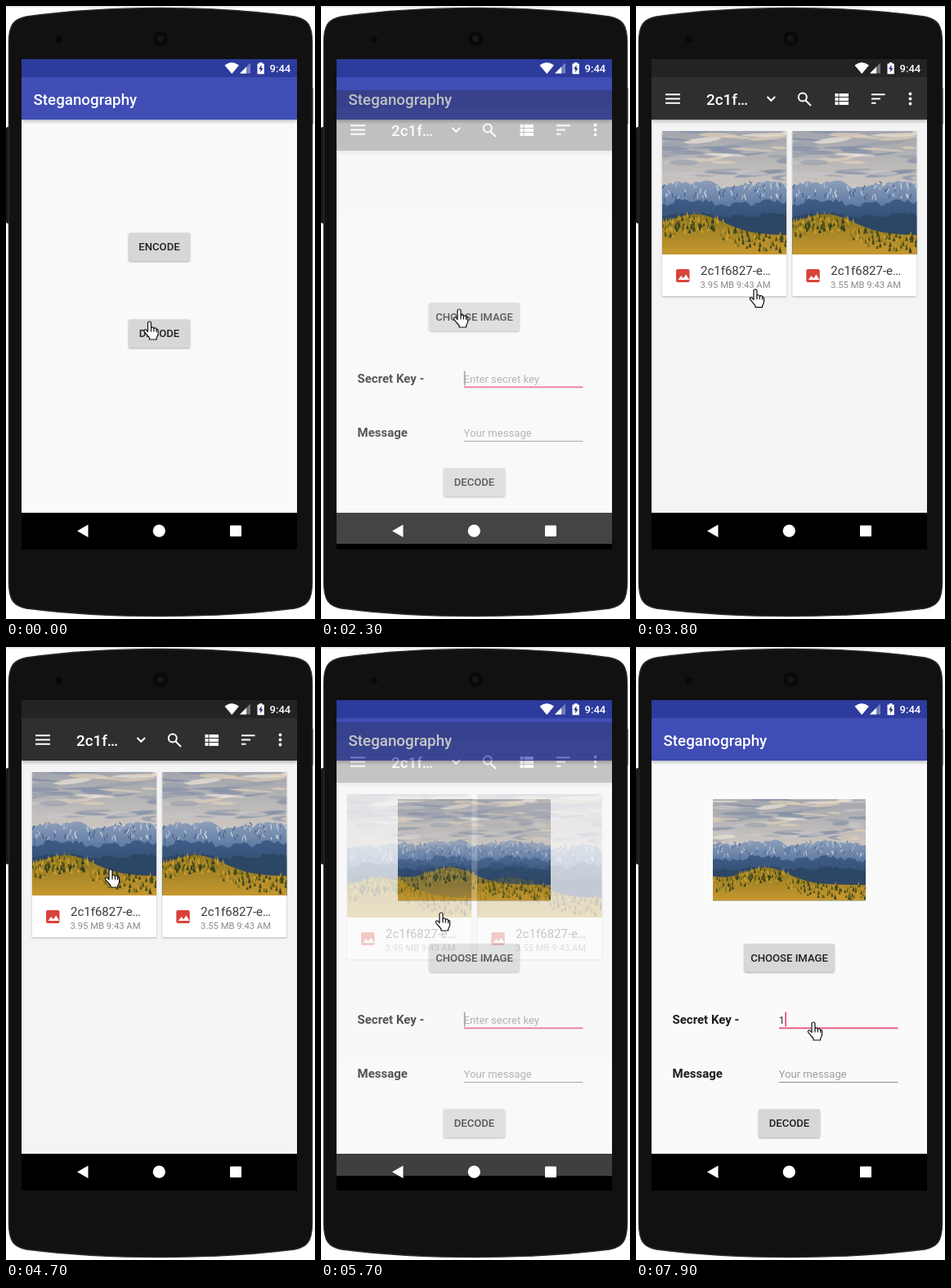
Animation, 378 px wide and 750 px high, one loop 8 s. Source, as an HTML page:

```html
<!DOCTYPE html>
<html lang="en">
<head>
<meta charset="utf-8">
<title>Steganography demo</title>
<style>
  html, body { margin: 0; width: 100%; height: 100%; overflow: hidden; background: #fff; }
  svg { display: block; }
  #stage { width: 378px; height: 750px; font-family: Roboto, sans-serif; }
  .title { font-size: 18.75px; font-weight: 500; fill: #fff; }
  .btn text { font-size: 13.1px; font-weight: 500; fill: #212121; text-anchor: middle; }
  .btn rect { fill: #d6d7d7; filter: drop-shadow(0 1px 1px #0005); }
  .label { font-size: 15px; font-weight: 700; fill: #1c1c1c; }
  .hint { font-size: 13.1px; fill: #9c9c9c; }
  .bar { filter: drop-shadow(0 2px 2px #0004); }
  .card { fill: #fff; filter: drop-shadow(0 1px 1px #0004); }
  .name { font-size: 15px; fill: #3a3a3a; }
  .info { font-size: 11.25px; fill: #8a8a8a; }
  .line { fill: none; stroke: #fff; stroke-width: 2; }
</style>
</head>
<body>
<svg id="stage" viewBox="0 0 378 750">
  <defs>
    <clipPath id="screen"><rect x="19" y="65" width="337" height="600"/></clipPath>
    <linearGradient id="sky" x2="0" y2="1">
      <stop offset="0" stop-color="#a2a5ad"/><stop offset=".55" stop-color="#d5cdc4"/><stop offset="1" stop-color="#e8dbc5"/>
    </linearGradient>
    <linearGradient id="rock" x2="0" y2="1">
      <stop offset="0" stop-color="#8d9fba"/><stop offset=".4" stop-color="#56749f"/><stop offset="1" stop-color="#34557f"/>
    </linearGradient>
    <linearGradient id="slope" x2="0" y2="1">
      <stop offset="0" stop-color="#3d5c87"/><stop offset="1" stop-color="#29405c"/>
    </linearGradient>
    <linearGradient id="grass" x2="0" y2="1">
      <stop offset="0" stop-color="#8a7620"/><stop offset="1" stop-color="#c7982f"/>
    </linearGradient>
    <filter id="soft"><feGaussianBlur stdDeviation="1.3 .6"/></filter>
    <symbol id="photo" viewBox="0 0 187 124"></symbol>
    <g id="file">
      <rect class="card" x="32" y="153" width="152" height="202" rx="1"/>
      <svg x="32" y="153" width="152" height="151" viewBox="0 0 187 124" preserveAspectRatio="xMidYMid slice"><g class="scene"/></svg>
      <rect x="49" y="322" width="16.5" height="16" rx="2" fill="#d8433a"/>
      <path d="M51.500 335l3.700-5 2.600 3.200 3.400-4.700 4 6.500z" fill="#fff"/>
      <text class="name" x="79" y="328.500">2c1f6827-e…</text>
    </g>
  </defs>

  <path d="M0 1H378" stroke="#e2e2e2" stroke-width="1.5"/>
  <rect y="148" width="6" height="118" rx="2" fill="#191919"/>
  <rect x="370" y="99" width="5.500" height="47" rx="2" fill="#191919"/>
  <path d="M3.500 45C3.500 22 10 16 25 13Q100 2.500 189 2.500T353 13C368 16 374.500 22 374.500 45V704C374.500 728 368 734 353 737Q278 746.500 189 746.500T25 737C10 734 3.500 728 3.500 704Z" fill="#111" stroke="#292929" stroke-width="1.500"/>
  <circle cx="65" cy="41" r="4" fill="#080808"/>
  <circle cx="189" cy="40" r="9" fill="#090909"/>
  <circle cx="189" cy="40" r="4" fill="#171717"/>

  <g clip-path="url(#screen)">
    <rect x="19" y="65" width="337" height="600"/>
    <g id="home"></g>
    <g id="decode">
      <g id="form"></g>
      <text class="label" x="44.500" y="460.500">Secret Key -</text>
      <text class="label" x="44.500" y="527">Message</text>
      <text class="hint" id="key" x="174.500" y="460.500"></text>
      <text class="hint" x="174.500" y="527">Your message</text>
      <rect id="caret" y="446.500" width="1.700" height="18"/>
      <rect x="175" y="465.500" width="145.500" height="1.700" fill="#e64c74"/>
      <rect x="175" y="532" width="145.500" height="1" fill="#8f8f8f"/>
      <use id="chosen" href="#photo" x="94" y="186" width="187" height="124.500"/>
    </g>
    <g id="picker">
      <rect x="19" y="65" width="337" height="555" fill="#f4f4f4"/>
      <rect class="bar" x="19" y="87" width="337" height="52" fill="#2f2f2f"/>
      <rect x="19" y="65" width="337" height="22" fill="#232323"/>
      <path class="line" d="M36 108.300h18M36 113.500h18M36 118.700h18M160.500 111l4.800 4.800 4.800-4.800M207.500 115.500l6.500 6.500M288 108.300h16.500M288 113.500h11M288 118.700h5.500"/>
      <circle class="line" cx="203.800" cy="111.500" r="5"/>
      <path d="M243.500 107h4v4h-4zm5 0h11.500v4h-11.500zM243.500 112h4v4h-4zm5 0h11.500v4h-11.500zM243.500 117h4v4h-4zm5 0h11.500v4h-11.500z" fill="#fff"/>
      <path d="M335.500 107.500v.01m0 5.990v.01m0 5.990v.01" stroke="#fff" stroke-width="3.800" stroke-linecap="round"/>
      <text class="title" x="86" y="120.500">2c1f…</text>
      <g id="files">
        <use href="#file"/><use href="#file" x="159.300"/>
        <text class="info" x="78.500" y="345">3.95 MB 9:43 AM</text>
        <text class="info" x="238" y="345">3.55 MB 9:43 AM</text>
      </g>
    </g>
    <g fill="#fff">
      <path d="M267.500 72.500Q276 65.500 285 72.500L276.300 83Z"/>
      <path d="M299 69.500V82.500H286Z" opacity=".35"/>
      <path d="M294 74.500V82.500H286Z"/>
      <path d="M307.500 70.500h2.300v-1.500h3.700v1.500h2.300v12.700h-8.300z"/>
      <path d="M312.500 72l-3.300 5.300h2v4l3.200-5.400h-1.900z" fill="#26347f"/>
      <text x="322.500" y="81" font-size="13.100" font-weight="500">9:44</text>
      <path d="M87 642.200L100.500 634.500V650Z"/>
      <circle cx="187.300" cy="642.200" r="7.600"/>
      <rect x="274" y="635.500" width="14" height="13.500" rx="1"/>
    </g>
  </g>

  <g id="hand" stroke="#111" stroke-width="1.200" stroke-linejoin="round">
    <path d="M-2 2a2 2 0 0 1 4 0V8.500q0-1.600 1.700-1.600T5.400 8.800q.2-1.200 1.700-1T8.600 9.800q2-.8 2 1.400V15q0 2-2 5v2H0v-2L-6.200 12.600q-1-2 .6-2.600 1.400-.4 2.400 1.200l1.200 1.500Z" fill="#fff"/>
    <path d="M2 8.500V12.500M5.400 8.800V12.500M8.600 9.800V13" fill="none"/>
  </g>
</svg>

<script>
const LOOP = 8000, STEP = 100;
const $ = id => document.getElementById(id);

const button = (y, width, label) => `<g class="btn">
  <rect x="${187.5 - width / 2}" y="${y}" width="${width}" height="34.500" rx="2"/>
  <text x="187.500" y="${y + 21.8}">${label}</text></g>`;

const appWindow = buttons => `
  <rect x="19" y="65" width="337" height="555" fill="#fafafa"/>
  <rect class="bar" x="19" y="87" width="337" height="52" fill="#3f4db5"/>
  <rect x="19" y="65" width="337" height="22" fill="#2c3b9c"/>
  <text class="title" x="33.500" y="120.800">Steganography</text>${buttons}`;

$('home').innerHTML = appWindow(button(277.5, 75, 'ENCODE') + button(383.5, 75, 'DECODE'));
$('form').innerHTML = appWindow(button(363, 110, 'CHOOSE IMAGE') + button(565.5, 75, 'DECODE'));

let seed = 11;
const random = () => (seed = seed * 16807 % 2147483647) / 2147483647;
const pick = list => list[Math.floor(random() * list.length)];
const repeat = (count, make) => Array.from({ length: count }, (_, i) => make(i)).join('');

function ridge(base, swing, rough, fill) {
  const points = repeat(64, i => {
    const x = i * 3;
    const y = base + swing * (Math.sin(x / 13) + .6 * Math.sin(x / 5 + 2)) + rough * random();
    return `L${x} ${y.toFixed(1)}`;
  });
  return `<path d="M0 124${points}V124Z" fill="${fill}"/>`;
}

const hillTop = x => 102 - 19 * Math.exp(-(((x - 66) / 38) ** 2)) + 3 * x / 187 - 7 * Math.exp(-x / 25);

function landscape() {
  const clouds = repeat(60, () => {
    const y = random() * 48;
    return `<ellipse cx="${random() * 187}" cy="${y}" rx="${8 + random() * 18}" ry="${1 + random() * 2}"
      fill="${pick(['#7f8da6', '#f2e8da', '#e4d2b8', '#989fac', '#c9c7c8'])}" opacity=".65"
      transform="rotate(${-8 + random() * 14} 93 ${y})"/>`;
  });
  const snow = repeat(90, () => {
    const x = random() * 187, y = 50 + random() * 17;
    return `<path d="M${x} ${y}l${random() * 5 - 2.5} ${2 + random() * 4}"
      stroke="${pick(['#d3d8e0', '#b9c3d3', '#3f5d88'])}" stroke-width=".9"/>`;
  });
  const hill = `<path d="M0 124${repeat(48, i => `L${i * 4} ${hillTop(i * 4)}`)}V124Z" fill="url(#grass)"/>`;
  const trees = repeat(300, i => {
    const x = random() * 187, depth = i / 300 * 17, size = 3 + random() * 4;
    const y = hillTop(x) + depth + 2;
    return `<path d="M${x - 1.5} ${y}l1.5 ${-size} 1.500 ${size}z"
      fill="${pick(['#35421d', '#4c4f1b', '#8b7722', '#b38d25', '#c89b2b'])}"/>`;
  });
  return `<rect width="187" height="124" fill="url(#sky)"/><g filter="url(#soft)">${clouds}</g>`
    + ridge(51, 2.4, 4, 'url(#rock)') + snow + ridge(70, 2, 5, 'url(#slope)')
    + ridge(83, 1.5, 3, '#2c4665') + hill + trees;
}

const scene = landscape();
$('photo').innerHTML = scene;
document.querySelector('.scene').innerHTML = scene;

// Rows: time, then the values reached at that time.
const handPath = [
  [0, 175.5, 386], [1000, 175.5, 386], [1400, 172.5, 335], [1800, 172.5, 335],
  [2100, 169, 371], [2400, 169, 371], [3000, 147, 351], [3700, 147, 351],
  [4400, 128, 272], [4800, 128, 272], [5400, 147, 325], [6000, 147, 325],
  [6800, 217, 459], [LOOP, 217, 459]
];
const decodeSlide = [[0, 6, 0], [1100, 6, 0], [1200, 6, .9], [1300, 0, 1], [LOOP, 0, 1]];
const pickerSlide = [
  [0, 48, 0], [2200, 48, 0], [2300, 38, .28], [2400, 12, .8], [2500, 3, 1], [2600, 0, 1],
  [5500, 0, 1], [5600, 11, .65], [5700, 27, .26], [5800, 48, 0], [LOOP, 48, 0]
];
const smooth = p => p * p * (3 - 2 * p);

function valuesAt(rows, t) {
  const next = rows.findIndex(row => row[0] > t);
  const [from, to] = [rows[next - 1], rows[next]];
  const p = smooth((t - from[0]) / (to[0] - from[0]));
  return from.slice(1).map((v, i) => v + (to[i + 1] - v) * p);
}

function place(id, [offset, opacity]) {
  $(id).setAttribute('transform', `translate(0 ${offset})`);
  $(id).setAttribute('opacity', opacity);
  $(id).style.display = opacity ? '' : 'none';
}

function draw(t) {
  const picker = valuesAt(pickerSlide, t);
  const typed = t >= 7800, covered = picker[1] > 0;
  place('decode', valuesAt(decodeSlide, t));
  place('picker', picker);
  $('hand').setAttribute('transform', `translate(${valuesAt(handPath, t)})`);
  $('files').style.display = t >= 2600 ? '' : 'none';
  $('chosen').style.display = t >= 5500 ? '' : 'none';

  $('key').textContent = typed ? '1' : 'Enter secret key';
  $('key').style.fill = typed ? '#333' : '';
  const blink = (t - (t < 5000 ? 1300 : 5600)) % 1000 < 500;
  $('caret').setAttribute('x', typed ? 182.3 : 174.8);
  $('caret').setAttribute('fill', covered ? '#8d8d8d' : '#e64c74');
  $('caret').style.display = covered || blink || t >= 7500 ? '' : 'none';
}

const start = performance.now();
function tick(now) {
  const t = Math.max(0, now - start) % LOOP;
  draw(Math.floor(t / STEP) * STEP);
  requestAnimationFrame(tick);
}
draw(0);
requestAnimationFrame(tick);
</script>
</body>
</html>
```
